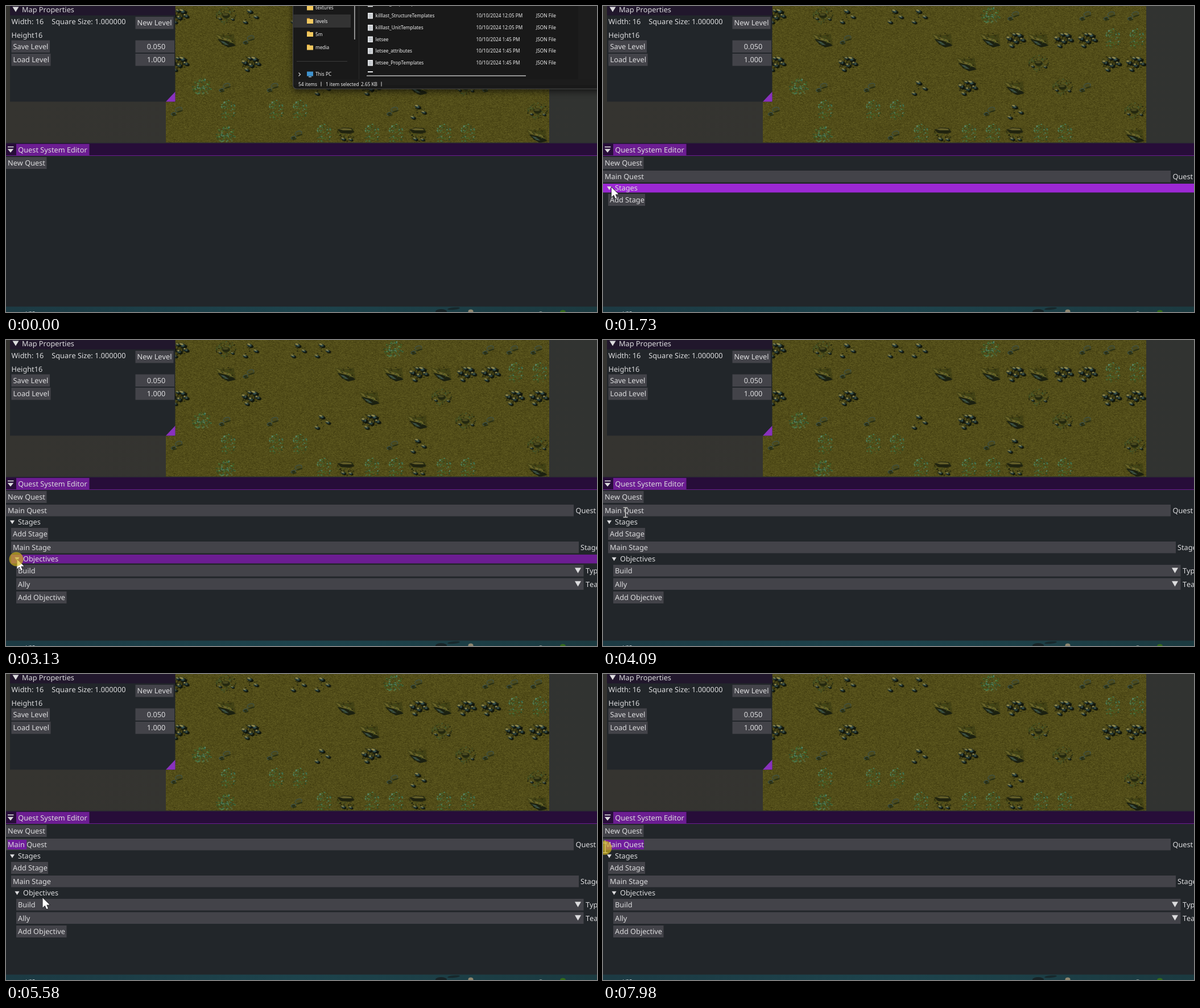
Animation of 1039 by 539 pixels, one loop 8 s. Source, as an HTML page with a canvas:

```html
<!DOCTYPE html>
<html lang="en">
<head>
<meta charset="utf-8">
<title>Quest editor</title>
<style>
html, body { margin: 0; width: 100%; height: 100%; overflow: hidden; background: #22262a; }
canvas { display: block; width: 100vw; height: 100vh; }
</style>
</head>
<body>
<canvas id="stage" width="1039" height="539"></canvas>
<script>
const W = 1039, H = 539, LOOP = 8000, TICK = 70;
const stage = document.getElementById('stage').getContext('2d');
const UI_FONT = '12.74px "Noto Sans", "Open Sans", sans-serif';
const FILE_FONT = '8.25px "Noto Sans", "Open Sans", sans-serif';
const C = {
  panel: '#22262a', frame: '#434349', text: '#dcdcde', hover: '#9c28d4',
  active: '#6c1d92', select: '#701d9c', title: '#270d39'
};
let g = stage;

function box(x, y, w, h, color) {
  g.fillStyle = color;
  g.fillRect(x, y, w, h);
}
function poly(color, ...p) {
  g.fillStyle = color;
  g.beginPath();
  for (let i = 0; i < p.length; i += 2) g.lineTo(p[i], p[i + 1]);
  g.closePath();
  g.fill();
}
function oval(x, y, rx, ry, color, turn = 0) {
  g.fillStyle = color;
  g.beginPath();
  g.ellipse(x, y, rx, ry, turn, 0, 7);
  g.fill();
}
function uiFont() {
  g.font = UI_FONT;
  g.fontKerning = 'none';
  g.textRendering = 'geometricPrecision';
}
// y is the middle of the capitals
function label(s, x, y, align = 'left') {
  uiFont();
  g.textAlign = align;
  g.fillStyle = C.text;
  g.fillText(s, x, y + 4.5);
}
function layer(w, h, draw) {
  const c = document.createElement('canvas');
  c.width = w;
  c.height = h;
  const back = g;
  g = c.getContext('2d');
  draw();
  g = back;
  return c;
}
function seeded(s) {
  return () => {
    s = (s + 0x6D2B79F5) | 0;
    let t = Math.imul(s ^ (s >>> 15), 1 | s);
    t = (t + Math.imul(t ^ (t >>> 7), 61 | t)) ^ t;
    return ((t ^ (t >>> 14)) >>> 0) / 4294967296;
  };
}

// ---------- terrain ----------
function rock(x, y, r) {
  oval(x + r * .45, y + r * .35, r * 1.05, r * .65, '#10150b', .35);
  oval(x, y, r * .9, r * .6, '#26362f', .35);
  oval(x + r * .2, y + r * .15, r * .4, r * .2, '#3d5c5c', .4);
  oval(x - r * .2, y - r * .3, r * .6, r * .25, '#948b4c', .2);
}
function specks(n, rx, ry, colors, seed) {
  const rnd = seeded(seed);
  for (let i = 0; i < n; i++) {
    const a = rnd() * 6.28, d = Math.sqrt(rnd());
    oval(Math.cos(a) * d * rx, Math.sin(a) * d * ry, .6 + rnd() * 1.1, .5 + rnd() * .7,
      colors[Math.floor(rnd() * colors.length)], rnd() * 3);
  }
}
const DARK = ['#1b1d0b', '#26290f', '#35340f', '#3d3c14'];
const GREEN = ['#3d6a2c', '#2f5527', '#4b7a3a', '#2a4a20', '#599058'];
const CYAN = ['#2f6a50', '#4a9076', '#264a2c', '#3c7a4a', '#62a08c'];
const MOSS = ['#3a4a1c', '#46531f', '#2f4420', '#3f5c38', '#5a5d26'];
const props = {
  A() {
    specks(50, 17, 12, DARK, 3);
    rock(-10, -1, 5.5); rock(1, 4, 5); rock(7, -7, 6);
    rock(13, 1, 5); rock(-6, 12, 4.2); rock(-1, -8, 4);
    g.strokeStyle = '#0d110a';
    g.lineWidth = 1;
    g.beginPath();
    for (let i = 0; i < 6; i++) { g.moveTo(-13 + i * 5, 8 - i); g.lineTo(-9 + i * 5, -3 - i % 3 * 2); }
    g.stroke();
  },
  B() {
    poly('#424114', -19, -9, -3, -6, 14, -9, 17, 11, 4, 14, -12, 5);
    poly('#1b2010', -15, 0, -2, 3, 8, 3, 17, 12, 4, 15, -7, 9);
    poly('#3c514a', -11, 3, -3, 5, 5, 11, -2, 10);
    poly('#6a652a', -18, -8, -4, -2, 7, 1, 14, 8, 0, 3, -12, -1);
    specks(34, 16, 10, DARK.concat(MOSS), 8);
  },
  C() {
    specks(14, 15, 11, DARK, 5);
    rock(-1, -7, 5); rock(10, 3, 4.2); rock(-9, 12, 4.2);
  },
  D() { specks(85, 17, 16, GREEN.concat(CYAN), 12); },
  E() {
    g.translate(4, 0);
    specks(60, 14, 19, CYAN.concat(GREEN), 21);
  },
  F() {
    specks(110, 18, 16, DARK.concat(MOSS), 17);
    oval(0, 1, 7, 4.5, '#24280f');
    oval(-1, -1, 5, 2, '#4a4a20');
    rock(11, 7, 3); rock(-11, 6, 3);
  },
  G() {
    g.strokeStyle = '#3d5450';
    g.lineWidth = 1.1;
    g.fillStyle = '#4a491c';
    for (const [x, y, r] of [[1, -2, 6], [-8, 6, 4]]) {
      g.beginPath();
      g.ellipse(x, y, r, r * .6, -.3, 0, 7);
      g.fill();
      g.stroke();
      oval(x + 2, y + r * .6, r, 1.2, '#2a2f12', -.3);
    }
  },
  H() {
    specks(60, 16, 13, DARK.concat(MOSS), 31);
    poly('#20230f', -15, -8, -5, -12, 10, -11, 15, -4, 7, -1, -8, -2);
    poly('#615c28', -12, -9, -4, -11, 9, -10, 11, -7, -5, -7);
    rock(-5, 8, 4); rock(8, 9, 3.5);
  }
};
const ROWS = [
  'A.FC.CC..DG..GGG',
  '..BG...B.BABAAEE',
  'A..A....B..F..AA',
  '.DG.G.C.A.B.FG..',
  'G.E.EE...GC....F',
  '..D..GEHEEHEE..B'
];
const terrain = layer(674, 241, () => {
  const rnd = seeded(77), img = g.createImageData(674, 241);
  for (let i = 0; i < img.data.length; i += 4) {
    const n = (rnd() + rnd() - 1) * 22;
    img.data[i] = 82 + n;
    img.data[i + 1] = 77 + n;
    img.data[i + 2] = 25 + n * .55;
    img.data[i + 3] = 255;
  }
  g.putImageData(img, 0, 0);
  ROWS.forEach((row, r) => [...row].forEach((kind, c) => {
    if (kind === '.') return;
    g.save();
    g.translate(42.13 * (c + .5) + 1, 16 + 42 * r);
    props[kind]();
    g.restore();
  }));
});

// ---------- fixed parts ----------
function triangle(x, y, w, h) {
  poly(C.text, x - w / 2, y - h / 2, x + w / 2, y - h / 2, x, y + h / 2);
}
function plainButton(s, x, y, w, h = 21.5) {
  box(x, y, w, h, C.frame);
  label(s, x + 3, y + h / 2);
}
function numberField(s, y) {
  box(227.5, y, 68.5, 21.5, C.frame);
  label(s, 264, y + 10.75, 'center');
}
const scene = layer(W, H, () => {
  const backdrop = g.createLinearGradient(0, 0, W, 0);
  backdrop.addColorStop(0, '#353430');
  backdrop.addColorStop(1, '#313331');
  box(0, 0, W, H, backdrop);
  g.drawImage(terrain, 280.5, 0);
  box(7, 0, 290.5, 168.5, C.panel);
  box(7, 0, 290.5, 16.5, '#21172c');
  triangle(17, 6, 11, 9);
  label('Map Properties', 28, 6.5);
  label('Width: 16', 9.5, 27.5);
  label('Square Size: 1.000000', 80.3, 27.5);
  label('Height16', 9.5, 51);
  plainButton('New Level', 227.5, 19, 67);
  plainButton('Save Level', 9.5, 60.5, 67.5);
  plainButton('Load Level', 9.5, 84, 69);
  numberField('0.050', 60.5);
  numberField('1.000', 84);
  poly('#8931bd', 297.5, 151, 297.5, 168.5, 281, 168.5);

  box(0, 240.5, W, 2, '#2b2a33');
  box(0, 242, W, 288, C.panel);
  box(0, 242, W, 21, C.title);
  box(18, 243, 128.5, 20, C.active);
  box(0, 263, W, 1, '#6c1d92');
  box(3, 247.5, 10.5, 1.6, C.text);
  triangle(8, 255, 10.5, 6.5);
  label('Quest System Editor', 21.3, 253.5);

  const strip = g.createLinearGradient(0, 0, W, 0);
  strip.addColorStop(0, '#1c3a43');
  strip.addColorStop(.5, '#1d434c');
  strip.addColorStop(1, '#1b3a40');
  box(0, 529.5, W, 10, strip);
  oval(765, 538, 10, 4, '#172326');
  oval(787, 533, 11, 2, '#17282c', -.1);
  oval(817, 538, 4.5, 3.5, '#8e8670');
  oval(979, 539, 5, 3.5, '#356b1c');
  oval(940, 540, 3, 2, '#8d9a96');
  g.fillStyle = '#cdd6d8';
  g.textAlign = 'left';
  g.font = '11px "Noto Sans", sans-serif';
  g.fillText('VIS', 35, 546);
});

function fileText(s, x, y) {
  g.font = FILE_FONT;
  g.textAlign = 'left';
  g.fillStyle = '#f0f0f0';
  g.fillText(s, x, y + 3);
}
function folder(s, y) {
  box(529, y - 5, 5, 3, '#d99f35');
  box(529, y - 3.5, 11, 8, '#f2c95f');
  fileText(s, 544, y);
}
function fileRow(name, y, time) {
  box(636, y - 5, 9, 10.5, '#e6e8ea');
  for (let i = 0; i < 3; i++) box(637.5, y - 2.5 + i * 2.5, 6, .9, '#8c949c');
  fileText(name, 649.5, y);
  fileText('10/10/2024 ' + time + ' PM', 826.5, y);
  fileText('JSON File', 932, y);
}
const explorer = layer(W, 170, () => {
  g.shadowColor = 'rgba(0,0,0,.6)';
  g.shadowBlur = 12;
  g.shadowOffsetY = 4;
  g.fillStyle = '#4a4a4a';
  g.beginPath();
  g.roundRect(504, -20, 560, 166.5, 7);
  g.fill();
  g.shadowColor = 'transparent';
  g.fillStyle = '#191919';
  g.beginPath();
  g.roundRect(505, -20, 560, 165.5, 6);
  g.fill();
  box(620, 0, 1, 129, '#2b2b2b');
  box(1006, 0, 33, 129, '#1d1d1d');
  box(505, 129, 534, 10, '#1c1c1c');
  box(505.5, 15, 100.5, 23, '#333333');
  box(612, 0, 1.8, 59, '#9c9c9c');
  folder('textures', 3);
  folder('levels', 26.5);
  folder('5m', 49.5);
  folder('media', 73);
  box(511, 97, 89, 1, '#3a3a3a');
  g.strokeStyle = '#d0d0d0';
  g.lineWidth = 1.2;
  g.beginPath();
  g.moveTo(514.5, 117.5);
  g.lineTo(517.5, 120.5);
  g.lineTo(514.5, 123.5);
  g.stroke();
  box(529, 115.5, 11, 8, '#3f93cf');
  box(532, 124, 5, 1.5, '#9fb4c2');
  fileText('This PC', 544, 120);
  fileRow('killlast_PropTemplates', -4, '12:05');
  fileRow('killlast_StructureTemplates', 17, '12:05');
  fileRow('killlast_UnitTemplates', 38, '12:05');
  fileRow('letsee', 58.5, '1:45');
  fileRow('letsee_attributes', 79, '1:45');
  fileRow('letsee_PropTemplates', 100, '1:45');
  box(636, 115, 9, 2, '#e6e8ea');
  box(634, 122, 280, 1.8, '#a0a0a0');
  fileText('54 items', 514, 137.5);
  fileText('1 item selected', 562, 137.5);
  fileText('2.65 KB', 624, 137.5);
  for (const x of [553.5, 659.5]) box(x, 133.5, 1, 8, '#d8d8d8');
});

// ---------- pointer ----------
const PATH = [
  [320, 760, -24], [780, 38, 272], [980, 38, 272], [1050, 36, 277], [1190, 36, 277],
  [1320, 14.5, 319], [2070, 14.5, 319], [2420, 40, 341], [2560, 40, 341], [2870, 22, 373],
  [2940, 20, 381], [3060, 19, 386], [3200, 19, 386], [3620, 44, 305], [3820, 44, 305],
  [4090, 39.5, 303.5], [4160, 39.5, 303.5], [4440, 3, 304], [4900, 3, 304], [5110, 30, 345],
  [5250, 70, 409], [5510, 70, 409], [5580, 64, 394], [5650, 63, 395], [5720, 58, 385],
  [6140, 43, 364], [6420, 43, 364], [6630, 69.5, 305], [6760, 69.5, 305], [7160, 28, 305],
  [7300, 8, 306], [7700, 8, 306], [7980, 4, 306]
];
const PRESSES = [[1050, 1190], [1460, 1600], [2420, 2560], [3060, 3200], [4160, 4900], [6760, LOOP]];

function pointerAt(t) {
  const i = PATH.findIndex(k => k[0] > t);
  if (i === 0) return [-99, -99];
  if (i < 0) return PATH[PATH.length - 1].slice(1);
  const [t0, x0, y0] = PATH[i - 1], [t1, x1, y1] = PATH[i];
  const n = Math.max(1, Math.round((t1 - t0) / TICK));
  const p = Math.floor((t - t0) / (t1 - t0) * n + 1e-6) / n;
  const e = p * p * (3 - 2 * p);
  return [x0 + (x1 - x0) * e, y0 + (y1 - y0) * e];
}
function drawArrow(x, y) {
  g.save();
  g.translate(x + .5, y + .5);
  g.beginPath();
  for (const [a, b] of [[0, 0], [0, 17], [4, 13.3], [6.8, 19.6], [9.5, 18.4], [6.8, 12.2], [12.2, 12]]) g.lineTo(a, b);
  g.closePath();
  g.lineWidth = 1.2;
  g.strokeStyle = '#15151a';
  g.stroke();
  g.fillStyle = '#fff';
  g.fill();
  g.restore();
}
function drawBeam(x, y) {
  for (const [pad, color] of [[.5, '#222'], [0, '#f4f4f4']]) {
    box(x - .6 - pad, y - 8 - pad, 1.3 + 2 * pad, 16 + 2 * pad, color);
    for (const dy of [-9, 8]) box(x - 4 - pad, y + dy - pad, 8 + 2 * pad, 1.2 + 2 * pad, color);
  }
}

// ---------- quest window ----------
const NAME = 'Main Quest';
function charX(i) {
  uiFont();
  return 3 + g.measureText(NAME.slice(0, i)).width;
}
function charAt(x) {
  let best = 0;
  for (let i = 1; i <= NAME.length; i++)
    if (Math.abs(charX(i) - x) < Math.abs(charX(best) - x)) best = i;
  return best;
}
function selection(t, x) {
  if (t >= 6760) return [charAt(x), NAME.length];
  if (t >= 4160) return [t < 4440 ? Math.min(5, charAt(x)) : 0, 5];
  return null;
}

function drawQuest(t, mx, my, down) {
  const over = (x, y, w, h) => mx >= x && mx < x + w && my >= y && my < y + h;
  const tint = (r, idle) => over(...r) ? (down ? C.active : C.hover) : idle;
  const button = (s, x, y, w) => {
    box(x, y, w, 21, tint([x, y, w, 21], C.frame));
    label(s, x + 3, y + 10.5);
  };
  const header = (s, x, y) => {
    const r = [x, y, W - x, 15.5], fill = tint(r, null);
    if (fill) box(...r, fill);
    label(s, x + 21, y + 7.8);
  };
  const combo = (s, name, y) => {
    const r = [18, y, 997.5, 20.5];
    box(...r, over(...r) ? C.active : C.frame);
    label(s, 21, y + 10.5);
    triangle(1005.5, y + 10, 11, 9.5);
    label(name, 1019, y + 10.5);
  };

  button('New Quest', 0, 266, 71.5);
  if (t < 1120) return;
  box(0, 290, 998, 20.5, C.frame);
  const sel = selection(t, mx);
  if (sel) {
    const a = charX(sel[0]), b = charX(sel[1]);
    box(a, 292, b - a, 17, C.select);
    if (down || (t + 150) % 1200 < 800) box(a, 293, 1, 14.5, C.text);
  }
  label(NAME, 3, 300.5);
  label('Quest Name', 1001.5, 300.5);

  const open = t >= 1530;
  header('Stages', 0, 313);
  if (open) triangle(11, 321, 8, 6.5);
  else poly(C.text, 8, 317, 14.5, 321, 8, 325);
  if (!open) return;
  button('Add Stage', 9, 331, 65);
  if (t < 2490) return;
  box(9, 355, 998, 20.5, C.frame);
  label('Main Stage', 12, 365.5);
  label('Stage Name', 1010, 365.5);

  const goals = t >= 3120;
  header('Objectives', 9, 378);
  if (goals) triangle(19.5, 386, 8, 6.5);
  else poly(C.text, 16.5, 382, 23, 386, 16.5, 390);
  if (!goals) return;
  combo('Build', 'Type', 396);
  combo('Ally', 'Team', 419.5);
  button('Add Objective', 18, 443, 88.5);
}

function drawExplorer(t) {
  if (t >= 320) return;
  const p = t < 110 ? 0 : (Math.floor((t - 110) / TICK) + 1) / 4;
  g.save();
  g.globalAlpha = 1 - p;
  g.translate(770, 560 * p * p);
  g.scale(1 - p * .6, 1 - p * .6);
  g.drawImage(explorer, -770, 0);
  g.restore();
}

function draw(t) {
  const [mx, my] = pointerAt(t);
  const down = PRESSES.some(([a, b]) => t >= a && t < b);
  g.drawImage(scene, 0, 0);
  drawQuest(t, mx, my, down);
  drawExplorer(t);
  const typing = (t >= 1120 && my >= 290 && my < 310.5) || (t >= 2490 && my >= 355 && my < 375.5 && mx >= 9);
  (typing ? drawBeam : drawArrow)(mx, my);
  if (down) oval(mx - 1, my, 12.5, 12.5, 'rgba(214,184,28,.66)');
}

const start = performance.now();
function frame() {
  draw((performance.now() - start) % LOOP);
  requestAnimationFrame(frame);
}
frame();
</script>
</body>
</html>
```
